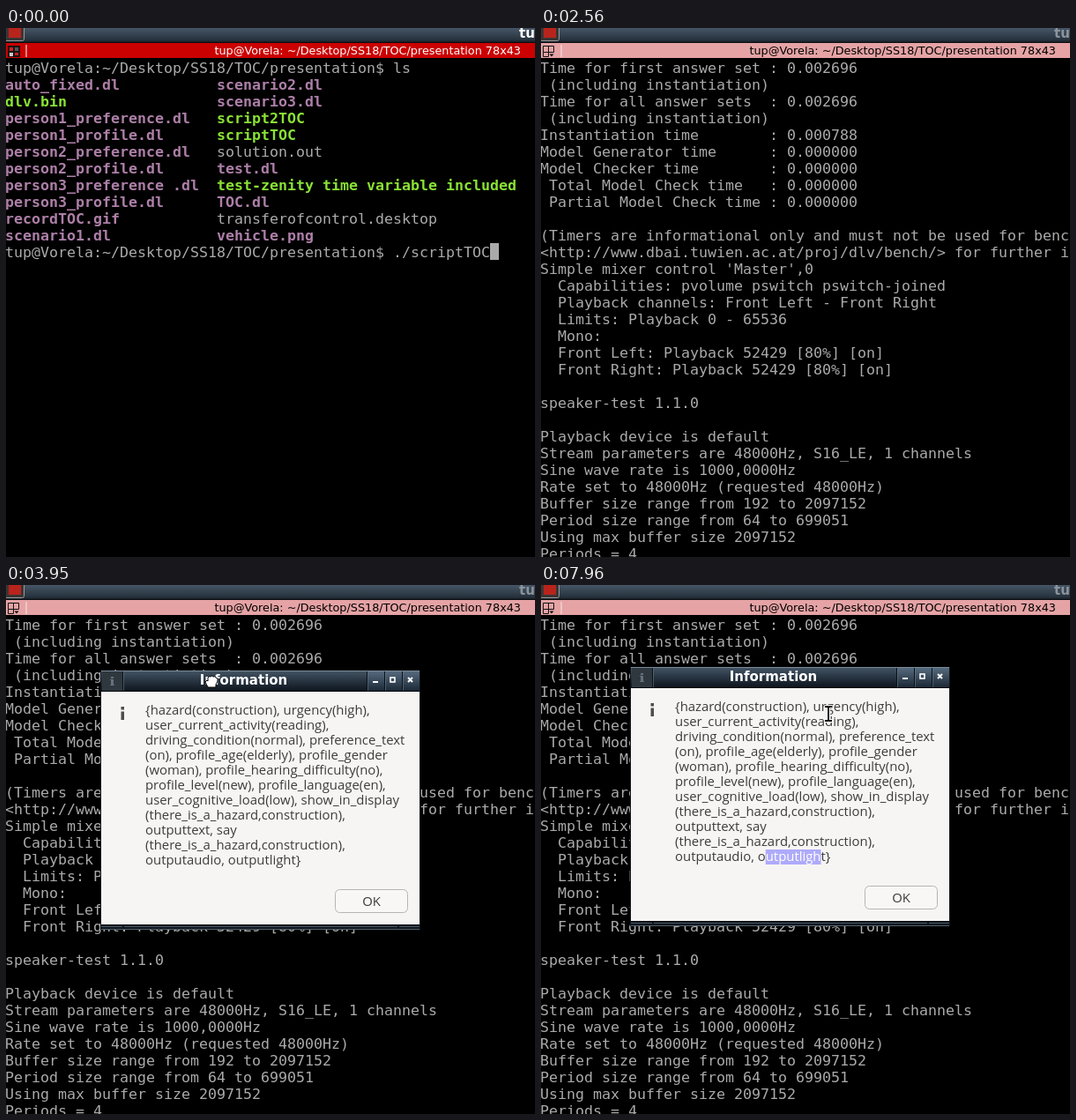
An HTML page for the animation above (8 s loop, 600 by 600 pixels).

```html
<!DOCTYPE html>
<html lang="en">
<head>
<meta charset="utf-8">
<title>Terminal session</title>
<style>
  html, body { margin: 0; width: 100%; height: 100%; overflow: hidden; background: #000; }
  svg { display: block; width: 100vw; height: 100vh; }
  text { white-space: pre; }
  #term { font: 16.61px "DejaVu Sans Mono", monospace; fill: #aaa; }
  .exe { fill: #8ae234; font-weight: bold; }
  .media { fill: #ad7fa8; font-weight: bold; }
  .wm { font: bold 15px "DejaVu Sans", sans-serif; }
  .bar { font: 12.8px "DejaVu Sans", sans-serif; }
  .msg { font: 14.9px "Open Sans", sans-serif; fill: #3c3c3c; }
</style>
</head>
<body>
<svg viewBox="0 0 600 600">
  <defs>
    <linearGradient id="frame" x2="0" y2="1">
      <stop offset="0" stop-color="#465666"/>
      <stop offset=".8" stop-color="#26323d"/>
      <stop offset="1" stop-color="#10161c"/>
    </linearGradient>
    <linearGradient id="cap" x2="0" y2="1">
      <stop offset="0" stop-color="#465666"/>
      <stop offset=".4" stop-color="#2c3a48"/>
      <stop offset="1" stop-color="#0c131b"/>
    </linearGradient>
    <linearGradient id="button" x2="0" y2="1">
      <stop offset="0" stop-color="#566a7e"/>
      <stop offset="1" stop-color="#1c2936"/>
    </linearGradient>
    <clipPath id="selClip"><rect id="selArea" y="207" height="17"/></clipPath>
  </defs>

  <rect width="600" height="600"/>
  <g id="term"></g>
  <rect id="block" width="10" height="19" fill="#aaa"/>

  <g id="header">
    <rect width="600" height="17" fill="url(#frame)"/>
    <path d="M0 16.5H600" stroke="#0a0d10"/>
    <rect x="-1" y="-6" width="21.5" height="20.5" rx="2" fill="#3a3535" stroke="#9a9a9a"/>
    <rect x="3" y="-3" width="14" height="14" fill="#b8241c"/>
    <text id="wmTitle" class="wm" x="582" y="11"></text>
    <rect id="bar" y="17" width="600" height="17"/>
    <g id="iconOn">
      <rect x="2" y="20" width="14" height="13" fill="#1a1212"/>
      <path d="M4 22h4v4h-4zM10 28h4v3h-4z" fill="#c22"/>
      <path d="M10 22h4v4h-4z" fill="#555"/>
      <path d="M4 28h4v4h-4z" fill="#ccc"/>
    </g>
    <g id="iconOff" fill="none" stroke="#111">
      <path d="M2.5 20.5h12v7h-12zM8.5 20.5v12M2.5 27.5v5h6"/>
      <path d="M9.5 29.5h5l-2.5 3z" fill="#111" stroke="none"/>
    </g>
    <path id="sep" d="M23 19V33" stroke-width="1.5"/>
    <text id="barTitle" class="bar" x="584" y="30" text-anchor="end"></text>
  </g>

  <g id="dialog">
    <rect x="-1" width="363" height="294" fill="#0d141b"/>
    <rect width="361" height="24" fill="url(#cap)"/>
    <rect x="1" y="1" width="23" height="22" fill="#2f383f"/>
    <path d="M302 1h19v22h-19zM322 1h19v22h-19zM342 1h19v22h-19z" fill="url(#button)"/>
    <path d="M0 .5H361" stroke="#7b8a98"/>
    <path d="M0 23.5H361" stroke="#05080b"/>
    <path d="M24.5 1V23M301.5 1V23M321.5 1V23M341.5 1V23" stroke="#0a1017"/>
    <path d="M25.5 1V23M302.5 1V23M322.5 1V23M342.5 1V23" stroke="#66788a" stroke-opacity=".6"/>
    <path d="M11 7h3v2h-3zM10 10h4v6h1v1h-5v-1h1v-5h-1z" fill="#67717a"/>
    <text class="wm" x="161.5" y="15.5" text-anchor="middle" fill="#fff">Information</text>
    <g fill="none" stroke="#fff" stroke-width="2">
      <path d="M308 13H314M348 8L353 13M353 8L348 13"/>
      <rect x="328" y="8" width="5" height="5" stroke-width="1.6"/>
    </g>
    <rect y="24" width="361" height="264" fill="#f7f5f4"/>
    <path d="M0 288.5H361" stroke="#05080b"/>
    <path d="M0 290.5H24M26 290.5H336M338 290.5H361" stroke="#44576a"/>
    <path d="M0 293.5H361" stroke="#53616e"/>
    <path d="M22.5 41h3.5v3.5h-3.5zM22.5 46.5h3.5v9.5h-3.5z" fill="#4d4d4d"/>
    <g id="msg" class="msg"></g>
    <rect id="sel" y="207" height="17" fill="#aeaafa"/>
    <g clip-path="url(#selClip)"><text id="selText" class="msg" style="fill:#fff" x="50" y="220"></text></g>
    <rect id="ok" x="265.5" y="248.5" width="82" height="26" rx="5" fill="#f8f7f6"/>
    <text class="msg" x="306.5" y="267" text-anchor="middle">OK</text>
  </g>

  <g id="pointers" stroke-linejoin="round">
    <g id="beam" fill="none">
      <path d="M-4 -8h3l1 1l1 -1h3M0 -7V7M-4 8h3l1 -1l1 1h3" stroke="#fff" stroke-width="4"/>
      <path d="M-4 -8h3l1 1l1 -1h3M0 -7V7M-4 8h3l1 -1l1 1h3" stroke="#000" stroke-width="1.8"/>
    </g>
    <path id="hand" d="M-4 7L-7 1L-5 -1L-4 0V-4Q-3 -6 -1 -5Q0 -7 2 -5Q4 -6 5 -4Q8 -4 7 0L5 4V7Z"
          fill="#fff" stroke="#000"/>
    <path id="arrow" d="M0 -8V6L3.3 3L5.5 8L8 7L5.8 2H10Z" fill="#000" stroke="#fff"/>
  </g>
</svg>

<script>
const LOOP = 8000, ROW = 19, COL = 10, TOP = 35, BASE = 16;
const user = 'tup', path = user + '@Vorela:~/Desktop/SS18/TOC/presentation';
const prompt = path + '$ ';
const $ = id => document.getElementById(id);
const show = (node, on) => node.setAttribute('display', on ? 'inline' : 'none');
const stat = (name, value) => name.padEnd(26) + ': ' + value;

function addText(parent, x, y, str, cls) {
  const node = document.createElementNS('http://www.w3.org/2000/svg', 'text');
  node.setAttribute('x', x);
  node.setAttribute('y', y);
  if (cls) node.setAttribute('class', cls);
  node.textContent = str;
  return parent.appendChild(node);
}

const files = `auto_fixed.dl|scenario2.dl
dlv.bin|scenario3.dl
person1_preference.dl|script2TOC
person1_profile.dl|scriptTOC
person2_preference.dl|solution.out
person2_profile.dl|test.dl
person3_preference .dl|test-zenity time variable included
person3_profile.dl|TOC.dl
recordTOC.gif|transferofcontrol.desktop
scenario1.dl|vehicle.png`.split('\n');

const ASK = 19;
const lines = [prompt + 'ls', ...files, prompt + './scriptTOC', '',
  ...['TOC - PROGRAM MENU', '1 - scenario1', '2 - scenario2', '3 - scenario3', '0 - exit program'].map(s => '    ' + s),
  '', 'Enter your scenario selection: ', '', '', '',
  'Options:   ORb = 1  ORp = 1  ORdr = 1  ODMS = 1  ODMS+ = 0  OFt = 1',
  ' OGp = 1  OGo = 2  OGs = 1  OH = 1  OPf = 1', '', '',
  'Residual Instantiation', stat(' Rules', 0), stat(' Constraints', 0), stat(' Weak Constraints', 0),
  stat('Structural Size', 9), stat('Used Atoms', 22), stat('Max. Level', 0), '',
  stat('Choice Points', 0), stat('Backtracks', 0), stat('Model Checks', 1), '',
  stat('Answer sets computed', 1), stat('Answer sets printed', 1), '',
  stat('Time for first answer set', '0.002696'), ' (including instantiation)',
  stat('Time for all answer sets', '0.002696'), ' (including instantiation)',
  stat('Instantiation time', '0.000788'),
  ...['Model Generator time', 'Model Checker time', ' Total Model Check time', ' Partial Model Check time']
    .map(s => stat(s, '0.000000')),
  '', '(Timers are informational only and must not be used for benchmarking',
  '<http://www.dbai.tuwien.ac.at/proj/dlv/bench/> for further information)',
  ...`Simple mixer control 'Master',0
  Capabilities: pvolume pswitch pswitch-joined
  Playback channels: Front Left - Front Right
  Limits: Playback 0 - 65536
  Mono:
  Front Left: Playback 52429 [80%] [on]
  Front Right: Playback 52429 [80%] [on]

speaker-test 1.1.0

Playback device is default
Stream parameters are 48000Hz, S16_LE, 1 channels
Sine wave rate is 1000,0000Hz
Rate set to 48000Hz (requested 48000Hz)
Buffer size range from 192 to 2097152
Period size range from 64 to 699051
Using max buffer size 2097152
Periods = 4`.split('\n')];

function fileClass(name) {
  if (/^(dlv|script|test-)/.test(name)) return 'exe';
  return /\.(out|desktop)$/.test(name) ? '' : 'media';
}

const rows = lines.map(line => {
  const g = $('term').appendChild(document.createElementNS('http://www.w3.org/2000/svg', 'g'));
  const cells = line.includes('|') ? line.split('|') : null;
  if (cells) cells.forEach((c, k) => addText(g, -1 + k * 24 * COL, BASE, c, fileClass(c)));
  else addText(g, -1, BASE, line);
  return g;
});
const answer = addText(rows[ASK], -1 + 31 * COL, BASE, '1');

const message = `{hazard(construction), urgency(high),
user_current_activity(reading),
driving_condition(normal), preference_text
(on), profile_age(elderly), profile_gender
(woman), profile_hearing_difficulty(no),
profile_level(new), profile_language(en),
user_cognitive_load(low), show_in_display
(there_is_a_hazard,construction),
outputtext, say
(there_is_a_hazard,construction),
outputaudio, outputlight}`.split('\n');
message.forEach((s, i) => addText($('msg'), 50, 50 + 17 * i, s));
$('selText').textContent = message[10];
$('wmTitle').textContent = user.slice(0, 2);
$('barTitle').textContent = path.replace(':', ': ') + ' 78x43';

// time, first visible line, lines printed
const output = [[0, 0, 12], [220, 0, 20], [1490, 2, 45], [1570, 12, 54], [1940, 14, 57], [1980, 19, 61],
  [2020, 28, 70], [2060, 33, 72], [2320, 35, 72], [2380, 38, 72], [2560, 42, 72]];

// pointer path after the drag: time, x, y
const walk = [[3960, 227, 105], [4180, 236, 352], [4460, 204, 296], [4680, 181, 269], [5020, 169, 270],
  [5060, 168, 272], [5400, 205, 277], [5800, 243, 274], [5920, 243, 274], [6110, 173, 310],
  [6280, 168, 311], [6450, 176, 311], [6630, 176, 311], [6860, 255, 312], [7160, 319, 315],
  [7360, 319, 315], [7620, 352, 250], [7960, 326, 146]];

const clamp = (v, a, b) => Math.min(b, Math.max(a, v));

function along(t) {
  const k = walk.findIndex(p => p[0] > t);
  if (k < 0) return walk[walk.length - 1].slice(1);
  const a = walk[Math.max(0, k - 1)], b = walk[k];
  const u = clamp((t - a[0]) / (b[0] - a[0] || 1), 0, 1), e = u * u * (3 - 2 * u);
  return [a[1] + (b[1] - a[1]) * e, a[2] + (b[2] - a[2]) * e];
}

function drawTerminal(t) {
  const [, first, count] = output.filter(s => s[0] <= t).pop();
  rows.forEach((g, i) => {
    show(g, i >= first && i < count);
    g.setAttribute('transform', `translate(0 ${TOP + (i - first) * ROW})`);
  });
  show(answer, t >= 790);
  const col = t < 220 ? 55 : t < 790 ? 31 : 32;
  $('block').setAttribute('x', -1 + col * COL);
  $('block').setAttribute('y', TOP + (t < 220 ? 11 : ASK) * ROW);
  show($('block'), t < 900);

  const active = t < 1940 || (t >= 2060 && t < 2560);
  $('bar').setAttribute('fill', active ? '#cb0000' : '#e5a3a5');
  $('barTitle').setAttribute('fill', active ? '#fff' : '#000');
  $('wmTitle').setAttribute('fill', active ? '#fff' : '#8b949c');
  $('sep').setAttribute('stroke', active ? '#e8b0b0' : '#f3cfd0');
  show($('iconOn'), active);
  show($('iconOff'), !active);
}

function drawDialog(t) {
  const open = t >= 3400;
  show($('dialog'), open);
  show($('pointers'), open);
  if (!open) return;
  const left = Math.pow(1 - clamp((t - 3400) / 780, 0, 1), 3.4);
  const dx = Math.round(102 + 408 * left), dy = Math.round(93 + 208 * Math.min(1, left * 1.15));
  $('dialog').setAttribute('transform', `translate(${dx} ${dy})`);
  $('ok').setAttribute('stroke', t >= 3960 && t < 5060 ? '#6ea6dc' : '#b8b4b1');

  const dragging = t < 3960;
  const [x, y] = dragging ? [dx + 125, dy + 12] : along(t);
  const arrow = !dragging && (y < 128 || y > 322);
  show($('hand'), dragging);
  show($('arrow'), arrow);
  show($('beam'), !dragging && !arrow);
  $('pointers').setAttribute('transform', `translate(${Math.round(x)} ${Math.round(y)})`);

  // selection snaps to whole letters
  const start = $('selText').getStartPositionOfChar(14).x;
  let end = start;
  if (t >= 6860) for (let i = 14; i < 23; i++) {
    const edge = $('selText').getEndPositionOfChar(i).x;
    if (t >= 7160 || edge <= x - dx + 4) end = edge;
  }
  for (const id of ['sel', 'selArea']) {
    $(id).setAttribute('x', start);
    $(id).setAttribute('width', end - start);
  }
}

const origin = performance.now();
function draw(now) {
  const t = Math.max(0, now - origin) % LOOP;
  drawTerminal(t);
  drawDialog(t);
  requestAnimationFrame(draw);
}
draw(origin);
</script>
</body>
</html>
```
